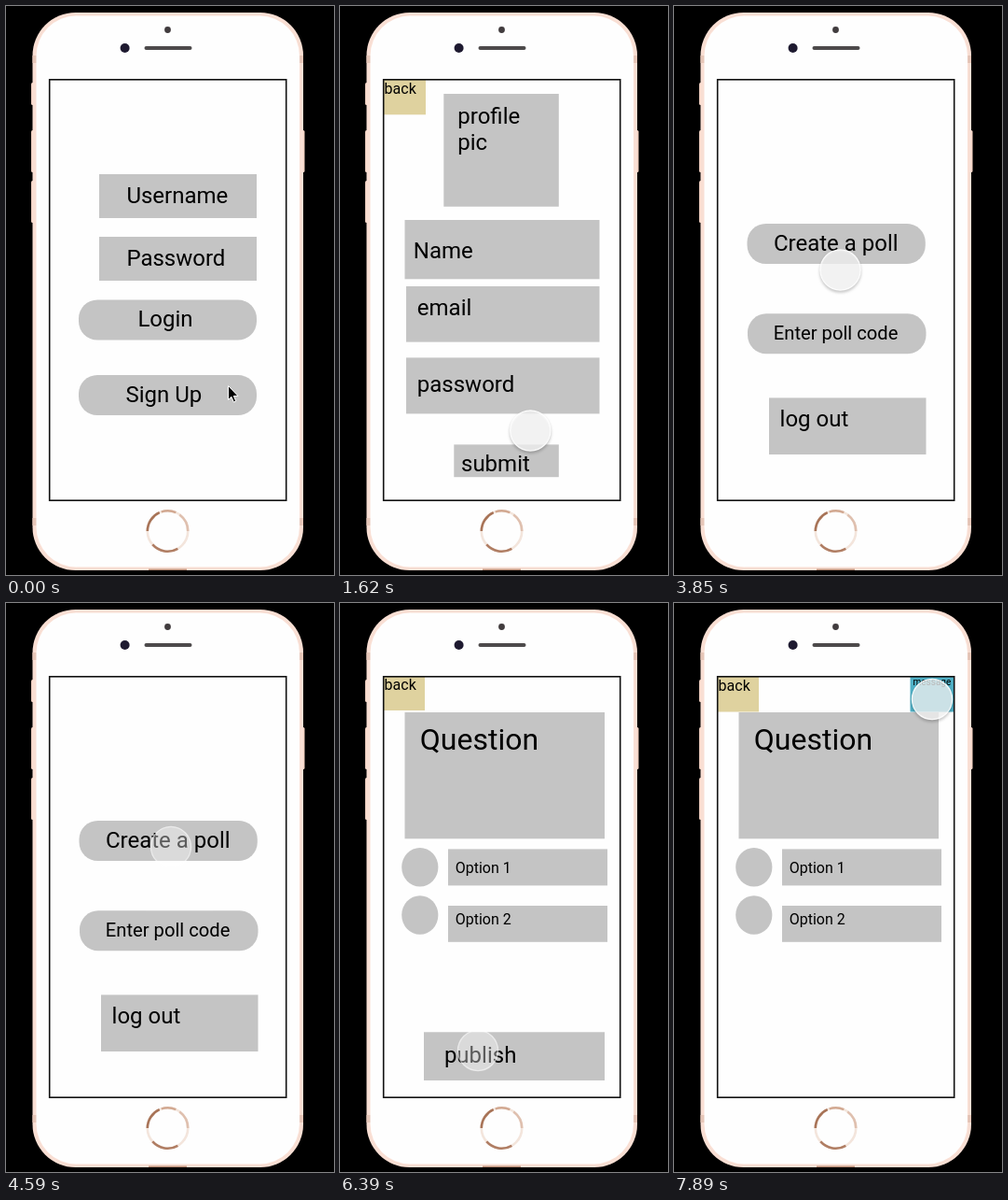
Animation, 352 px wide and 609 px high, one loop 8000 ms. Source, as an HTML page:

```html
<!DOCTYPE html>
<html lang="en">
<head>
<meta charset="utf-8">
<title>Poll app prototype</title>
<style>
  html, body { margin: 0; width: 100%; height: 100%; overflow: hidden; background: #000; }
  svg { display: block; width: 100%; height: 100%; }
  text { font-family: Roboto, Arial, sans-serif; fill: #000; white-space: pre; }
  #touch { fill: #fff; fill-opacity: .73; stroke: #fff; stroke-opacity: .9; stroke-width: 1.2; filter: drop-shadow(0 2.4px 1.5px rgba(0, 0, 0, .27)); }
  #touch.pressed { fill-opacity: .36; stroke-opacity: .6; filter: none; }
</style>
</head>
<body>
<svg viewBox="0 0 352 609">
  <rect width="352" height="609"/>
  <g fill="#f3d3c5">
    <rect x="27" y="82" width="4" height="24" rx="1.5"/>
    <rect x="27" y="133" width="4" height="45" rx="1.5"/>
    <rect x="27" y="187" width="4" height="45" rx="1.5"/>
    <rect x="316" y="133" width="4.5" height="45" rx="1.5"/>
  </g>
  <rect x="28.5" y="7" width="290.5" height="597" rx="46" fill="#f9dfd4"/>
  <g fill="#e6c6b8">
    <rect x="28.5" y="53" width="5" height="8"/>
    <rect x="314" y="53" width="5" height="8"/>
    <rect x="28.5" y="548" width="5" height="8"/>
    <rect x="314" y="548" width="5" height="8"/>
  </g>
  <rect x="32.5" y="10.5" width="282.5" height="590" rx="43" fill="#fefefe"/>
  <path d="M153 603.3H194" stroke="#b98d78" stroke-width="1.5"/>
  <circle cx="173.5" cy="25.5" r="3.4" fill="#413c3e"/>
  <circle cx="127.6" cy="45" r="5" fill="#1e1a30"/>
  <path d="M150.5 45H197.5" stroke="#4d4a4b" stroke-width="4" stroke-linecap="round"/>
  <g id="home" fill="none" stroke-width="2.6"></g>
  <g id="screens"></g>
  <rect x="46.7" y="78.8" width="254" height="450.4" fill="none" stroke="#111" stroke-width="1.6"/>
  <path id="arrow" d="M238.5 406.5v15l3.4-3.2 2.5 5.7 2.4-1-2.5-5.6h4.7z" stroke="#fff" stroke-width="1"/>
  <circle id="touch" r="21.6"/>
</svg>
<script>
const LOOP = 8000, GREY = '#c4c4c4', SAND = '#dfd29f', TEAL = '#4fb0c6';
const byId = id => document.getElementById(id);

const box = (x, y, w, h, fill = GREY, r = 0) =>
  `<rect x="${x}" y="${y}" width="${w}" height="${h}" rx="${r}" fill="${fill}"/>`;
const pill = (x, y, w, h) => box(x, y, w, h, GREY, 20);
const dot = y => `<ellipse cx="85.8" cy="${y}" rx="19.6" ry="20.8" fill="${GREY}"/>`;
const label = (x, y, s, size = 24) => `<text x="${x}" y="${y}" font-size="${size}">${s}</text>`;
const back = (w, h, y) => box(47, 79, w, h, SAND) + label(47.6, y, 'back', 16);

// Arc of the home button; start and length in clock hours.
const arc = (hour, length, color) =>
  `<circle cx="173.5" cy="562" r="21.7" stroke="${color}" pathLength="12"
    stroke-dasharray="${length} 12" transform="rotate(${hour * 30 - 90} 173.5 562)"/>`;
byId('home').innerHTML =
  arc(0, 12, '#f3e5dc') + arc(9, 2.2, '#a87458') + arc(11.4, 1.4, '#d2a992') +
  arc(1.2, 1.8, '#dfc0af') + arc(5, 2.6, '#b07e64');

const question =
  box(69.5, 117, 214.5, 135.3) + label(85.8, 157, 'Question', 32) +
  dot(282.8) + box(116, 263.4, 171, 39) + label(123.7, 289, 'Option 1', 16) +
  dot(334) + box(116, 324, 171, 38.8) + label(123.7, 343.5, 'Option 2', 16);

const screens = [
  { from: 0, art:
    box(100, 180, 169, 47) + label(129.4, 211, 'Username') +
    box(100, 247, 169, 47) + label(129.4, 278, 'Password') +
    pill(78, 314.5, 191, 43) + label(141.4, 343, 'Login') +
    pill(78, 395, 191, 43) + label(128.5, 424, 'Sign Up') },
  { from: 1020, art:
    back(45, 37.3, 94.3) +
    box(111.3, 94, 123.5, 120.7) + label(126.3, 126, 'profile') + label(126.3, 154, 'pic') +
    box(69.5, 229, 209, 63.3) + label(78.8, 270, 'Name') +
    box(71, 300, 207.5, 59.6) + label(82.8, 331, 'email') +
    box(71, 376.4, 207.5, 60) + label(82.8, 413, 'password') +
    box(122.3, 469.4, 112.5, 34.8) + label(130, 498, 'submit') },
  { from: 2650, art:
    pill(78.5, 233, 191.3, 43) + label(106.9, 262, 'Create a poll') +
    pill(79, 329.3, 191.5, 43) + label(106.8, 357.3, 'Enter poll code', 20.2) +
    box(102, 419.4, 168.5, 60.6) + label(113.6, 450, 'log out') },
  { from: 4740, art:
    back(44, 36, 93) + question +
    box(90, 459.3, 194, 51.7) + label(111.9, 492, 'publish') },
  { from: 6690, art:
    back(44, 37.5, 94.3) + box(253.5, 79, 47, 37.5, TEAL) +
    label(256.5, 88.3, 'message', 10) + question }
];
byId('screens').innerHTML = screens.map(s => `<g>${s.art}</g>`).join('');
const groups = [...byId('screens').children];

// The pointer is sampled in coarse steps: each move slows down over n of them.
const TOUCH_AT = 420, START = [238, 410];
const moves = [
  { from: 420, to: 720, n: 3, x: 219, y: 412 },
  { from: 1620, to: 2060, n: 4, x: 193, y: 487 },
  { from: 3250, to: 4440, n: 9, x: 177, y: 261 },
  { from: 5790, to: 6240, n: 4, x: 148, y: 479 },
  { from: 6990, to: 7890, n: 7, x: 277, y: 103 }
];
const presses = [[870, 1020], [2360, 2650], [4590, 4740], [6390, 6690]];
const ease = p => 1 - (1 - p) ** 2.9;

function pointerAt(t) {
  let [x, y] = START;
  for (const m of moves) {
    if (t < m.from) break;
    const gap = (m.to - m.from) / (m.n - 1);
    const step = Math.min(m.n, Math.floor((t - m.from) / gap + 0.02) + 1);
    const e = ease(step / m.n);
    x += (m.x - x) * e;
    y += (m.y - y) * e;
  }
  return [x, y];
}

function draw(t) {
  const current = screens.filter(s => s.from <= t).length - 1;
  groups.forEach((g, i) => { g.style.display = i === current ? '' : 'none'; });
  const touching = t >= TOUCH_AT, [x, y] = pointerAt(t), touch = byId('touch');
  byId('arrow').style.display = touching ? 'none' : '';
  touch.style.display = touching ? '' : 'none';
  touch.setAttribute('cx', x);
  touch.setAttribute('cy', y);
  touch.classList.toggle('pressed', presses.some(([a, b]) => t >= a && t < b));
}

const began = performance.now();
function tick() {
  draw((performance.now() - began) % LOOP);
  requestAnimationFrame(tick);
}
tick();
</script>
</body>
</html>
```
